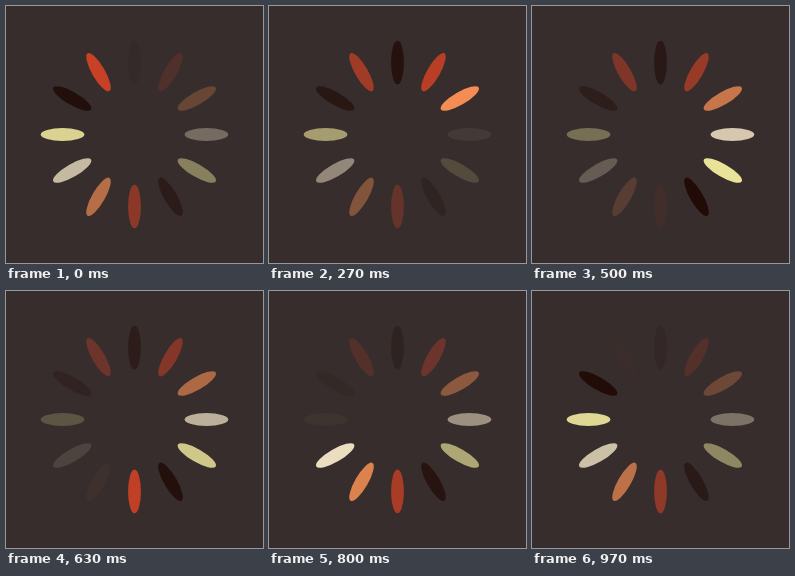
Recreate the animation shown at these times as an HTML page. Size 257 px wide and 257 px high, loop 1000 ms.

```html
<!DOCTYPE html>
<html lang="en">
<head>
<meta charset="utf-8">
<title>Spinner</title>
<style>
  html, body { margin: 0; width: 100%; height: 100%; overflow: hidden; background: #362d2c; }
  svg { display: block; width: 100vw; height: 100vh; }
</style>
</head>
<body>
<svg id="stage" viewBox="0 0 100 100"></svg>
<script>
const COUNT = 12, FPS = 30, LOOP = 1000;
const colors = ['#210b07', '#c84126', '#f68f54', '#f5e8c9', '#faf3a4'];
const stage = document.getElementById('stage');

const petals = Array.from({ length: COUNT }, (_, i) => {
  const petal = document.createElementNS('http://www.w3.org/2000/svg', 'ellipse');
  const attrs = {
    cx: 50, cy: 22, rx: 2.5, ry: 8.5,
    fill: colors[i % colors.length],
    transform: `rotate(${i * 360 / COUNT} 50 50)`
  };
  for (const name in attrs) petal.setAttribute(name, attrs[name]);
  return stage.appendChild(petal);
});

// Steps of 1/30 s, with their starts rounded to 10 ms.
function stepAt(ms) {
  const tick = Math.floor((ms % LOOP) / 10) * 10;
  return Math.floor((tick + 5) * FPS / 1000);
}

// Each petal lights up in turn and fades out linearly over one loop.
function render(ms) {
  const time = Math.floor(stepAt(ms) * 1000 / FPS) / 1000;
  petals.forEach((petal, i) => {
    const phase = (time + (COUNT - 1 - i) / COUNT) % 1;
    petal.setAttribute('opacity', 1 - phase);
  });
}

const start = performance.now();
function loop() {
  render(performance.now() - start);
  requestAnimationFrame(loop);
}
loop();
</script>
</body>
</html>
```
